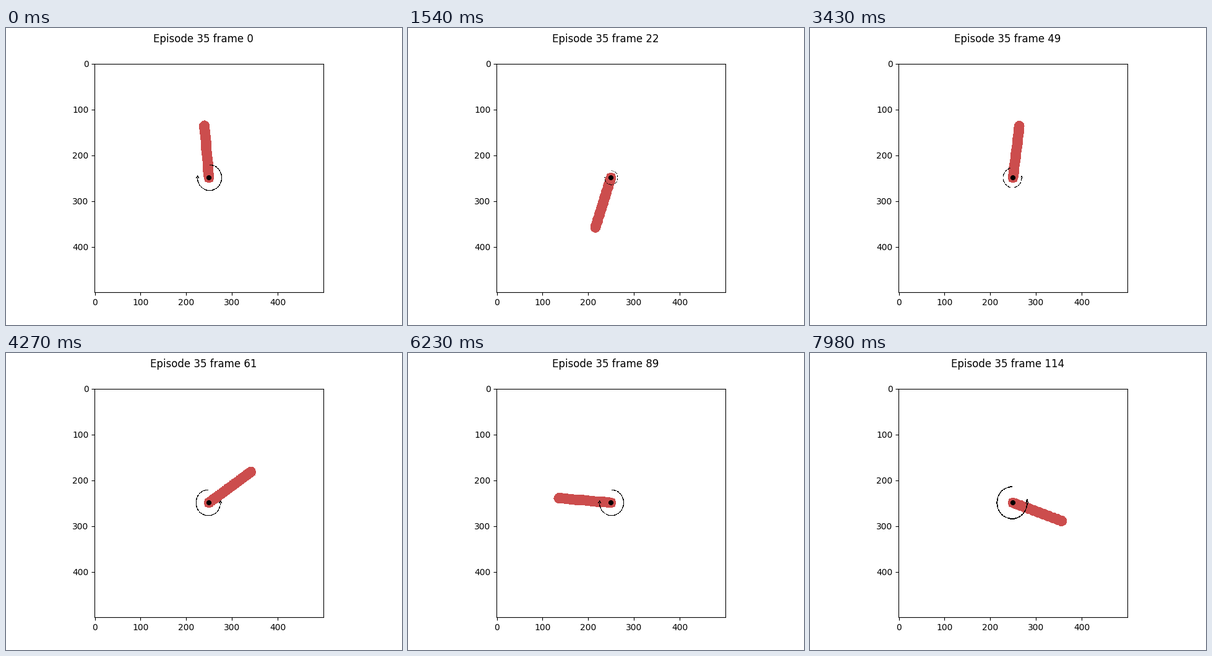
A matplotlib script that plays this animation: 640 px wide and 480 px high, repeating every 8000 ms.

```python
import numpy as np
import matplotlib.pyplot as plt
from matplotlib.animation import FuncAnimation

LOOP_MS, STEP_MS, TICK_MS = 8000, 70, 40
SIZE = 500                       # side of the simulated screen
HALF = 130                       # half side of the area that gets painted
ROD_LENGTH, ROD_RADIUS, AXLE_RADIUS = 113.6, 11.4, 5.7
RING_X, RING_Y = 32.9, 35.0      # torque ring radii at full torque
ROD_COLOR, BLACK = (204, 77, 77), (0, 0, 0)

# Poses the swing passes through: step, clockwise angle from upright.
KEY_STEPS = [0, 6, 12, 17, 22, 26, 31, 36, 43, 49, 55,
             61, 67, 72, 77, 83, 89, 94, 98, 102, 107, 114]
KEY_ANGLES = [-.085, .41, .945, 1.9, 3.444, 4.63, 5.43, 5.851, 6.2, 6.408, 6.67,
              7.22, 8.54, 10.071, 11.18, 11.54, 11.082, 10.01, 8.76, 7.83, 7.475, 8.212]

# The controller pushes towards upright, harder the closer the rod is to it.
POLICY_ANGLES = [-2.84, -2.5, -1.5, -.43, -.25, -.085, .125, .9, 1.93, 3.14]
POLICY_TORQUES = [.87, .78, 1.6, 1.77, 1.95, 1.6, -1.23, -1.6, -2, .2]

axis = np.arange(-HALF, HALF) + 0.5
X, Y = np.meshgrid(axis, axis)   # y points down


def natural_spline(t, y):
    """Return a function for the natural cubic spline through the points."""
    t, y = np.array(t, float), np.array(y)
    h = np.diff(t)
    slope = np.diff(y) / h
    system, rhs = np.eye(len(t)), np.zeros(len(t))
    for i in range(1, len(t) - 1):
        system[i, i - 1:i + 2] = h[i - 1], 2 * (h[i - 1] + h[i]), h[i]
        rhs[i] = 6 * (slope[i] - slope[i - 1])
    bend = np.linalg.solve(system, rhs)

    def value(s):
        i = min(np.searchsorted(t, s, side="right") - 1, len(h) - 1)
        a, b = (t[i + 1] - s) / h[i], (s - t[i]) / h[i]
        curve = (a**3 - a) * bend[i] + (b**3 - b) * bend[i + 1]
        return a * y[i] + b * y[i + 1] + curve * h[i]**2 / 6

    return value


angle_at = natural_spline(KEY_STEPS, KEY_ANGLES)


def torque_at(angle):
    return np.interp(angle, POLICY_ANGLES, POLICY_TORQUES, period=2 * np.pi)


def rod_mask(angle):
    dx, dy = np.sin(angle), -np.cos(angle)
    along = np.clip(X * dx + Y * dy, 0, ROD_LENGTH)
    return np.hypot(X - along * dx, Y - along * dy) < ROD_RADIUS


def torque_mask(torque):
    """Three-quarter ring with an arrowhead, mirrored by the torque's sign."""
    x = 1.8 - 2 * X / torque
    y = 2 * Y / abs(torque)
    ring = np.abs(np.hypot(x / RING_X, y / RING_Y) - 1) * 34 < 0.95
    ring &= ~((x > 0) & (y < 0))
    side = np.abs(x - RING_X)
    head = (side < 0.4 * (y + 9)) & (y < 0.8 * side - 1.5)
    return ring | head


def render(step):
    canvas = np.full((SIZE, SIZE, 3), 255, np.uint8)
    mid = SIZE // 2
    view = canvas[mid - HALF:mid + HALF, mid - HALF:mid + HALF]
    angle = angle_at(step)
    view[rod_mask(angle)] = ROD_COLOR
    view[np.hypot(X, Y) < AXLE_RADIUS] = BLACK
    torque = torque_at(angle)
    if torque:
        view[torque_mask(torque)] = BLACK
    return canvas


fig, ax = plt.subplots(figsize=(6.4, 4.8), dpi=100)
screen = ax.imshow(render(0), interpolation="nearest")
title = fig.suptitle("", x=0.499, y=0.982)


def update(tick):
    # The offset keeps each step visible at its exact start time.
    step = (tick * TICK_MS + 30) // STEP_MS
    screen.set_data(render(step))
    title.set_text(f"Episode 35 frame {step}")
    return screen, title


anim = FuncAnimation(fig, update, frames=LOOP_MS // TICK_MS, interval=TICK_MS,
                     repeat=True, repeat_delay=0)
plt.show()
```
